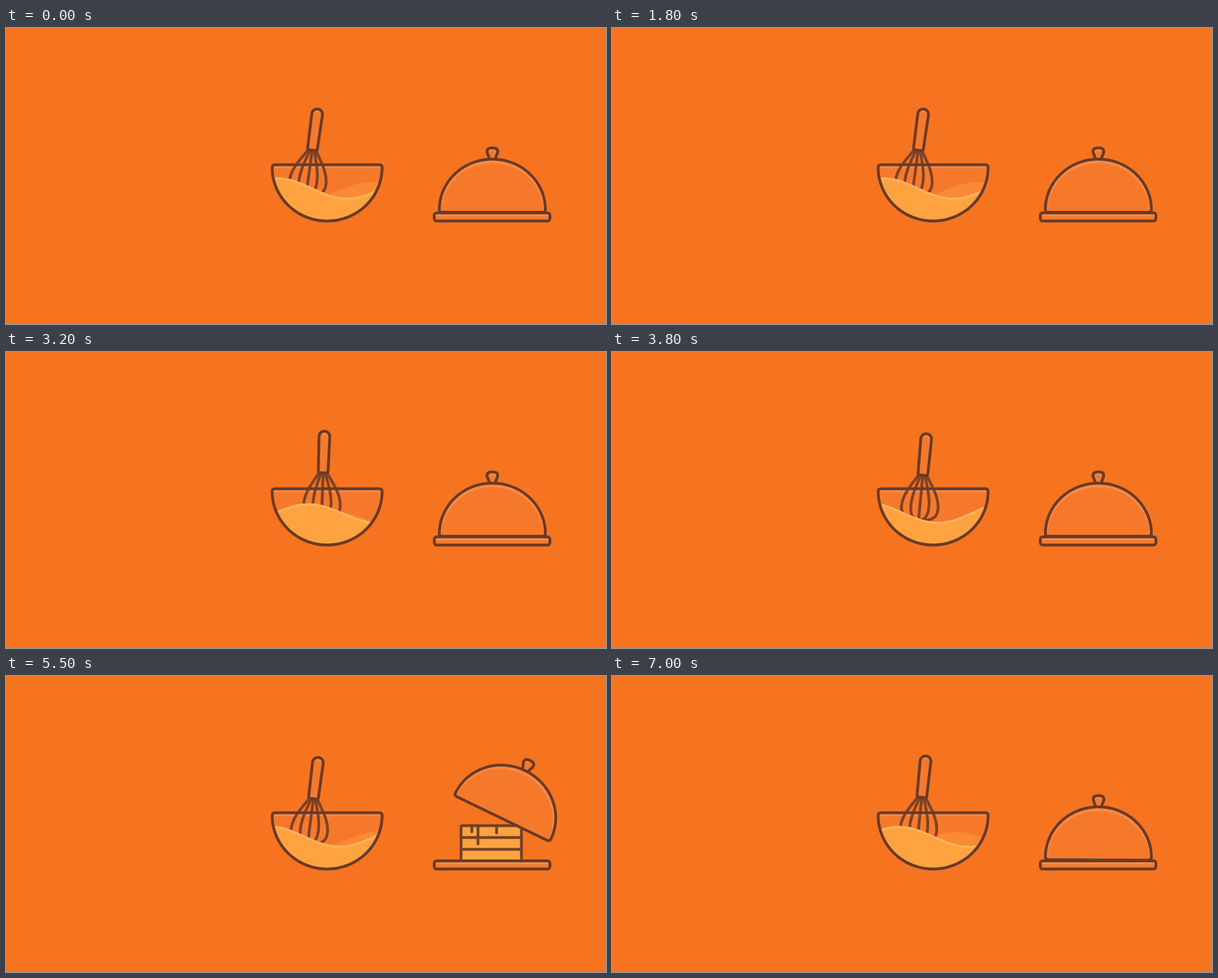
Recreate the animation shown at these times as an HTML page. Size 1064 by 526 pixels, loop 7.1 s.

```html
<!DOCTYPE html>
<html lang="en">
<head>
<meta charset="utf-8">
<title>Whisk and cloche</title>
<style>
  html, body { margin: 0; width: 100%; height: 100%; overflow: hidden; background: #f67420; }
  svg { display: block; width: 100%; height: 100%; }
  .line { fill: none; stroke: #6b3a26; stroke-width: 5; stroke-linecap: round; stroke-linejoin: round; }
  .body { fill: #f6792b; }
  .shine { fill: #fff; fill-opacity: .13; }
  .batter { fill: #ffa340; }
</style>
</head>
<body>
<svg viewBox="0 0 1064 526">
  <defs>
    <path id="bowl" d="M472 248Q472 243 477 243H662Q667 243 667 248A97.5 95 0 0 1 472 248Z"/>
    <path id="dome" d="M768.5 322.5A94 89.5 0 0 1 956.5 322.5Q956.5 327.5 951.5 327.5H773.5Q768.5 327.5 768.5 322.5Z"/>
    <path id="knob" d="M857 232C856 226 853 224 853 219.5Q853 213 862.5 213Q872 213 872 219.5C872 224 869 226 868 232"/>
    <path id="grip" d="M-9.5 -64.5A9.5 9.5 0 0 1 9.5 -64.5L8.7 -3Q8.5 0 5.5 0H-5.5Q-8.5 0 -8.7 -3Z"/>
    <clipPath id="inBowl"><use href="#bowl"/></clipPath>
    <clipPath id="inDome"><use href="#dome"/></clipPath>
  </defs>

  <use href="#bowl" class="body"/>
  <g clip-path="url(#inBowl)">
    <rect class="shine" x="472" y="243" width="195" height="6"/>
    <path id="back" class="batter" opacity=".42"/>
  </g>
  <g id="whisk">
    <g class="line" opacity=".86">
      <path d="M0 0V78"/>
      <path d="M3.5 0C9 18 16 36 16 55C16 70 11 80 0 80C-11 80 -16 70 -16 55C-16 36 -9 18 -3.5 0"/>
      <path d="M7 0C18 18 32 36 32.5 57C32.5 74 22 80 0 80C-22 80 -32.5 74 -32.5 57C-32 36 -18 18 -7 0"/>
    </g>
    <use href="#grip" class="body"/>
    <path class="shine" d="M-7 -64.5A7 7 0 0 1 7 -64.5A7 4 0 0 0 -7 -64.5Z"/>
    <use href="#grip" class="line"/>
  </g>
  <g clip-path="url(#inBowl)">
    <path id="front" class="batter"/>
    <path id="crest" fill="none" stroke="#ffb15c" stroke-width="4"/>
  </g>
  <use href="#bowl" class="line"/>

  <rect class="batter" x="807" y="266" width="107" height="62" rx="4"/>
  <g class="line" opacity=".93">
    <path d="M807 324V268Q807 266 809 266H912Q914 266 914 268V324M807 287H914M807 308H914"/>
    <path id="drips"/>
  </g>

  <rect class="body" x="759.5" y="328.5" width="205" height="14.5" rx="4"/>
  <rect class="shine" x="762" y="331" width="200" height="4"/>
  <rect class="line" x="759.5" y="328.5" width="205" height="14.5" rx="4"/>

  <g id="lid">
    <use href="#knob" class="body"/>
    <path class="shine" d="M855.5 219.5Q855.5 215.5 862.5 215.5Q869.5 215.5 869.5 219.5Q862.5 217.5 855.5 219.5Z"/>
    <use href="#knob" class="line"/>
    <use href="#dome" class="body"/>
    <g clip-path="url(#inDome)">
      <path class="shine" d="M768.5 322.5A94 89.5 0 0 1 956.5 322.5L953 327A90.5 86.5 0 0 0 772 327Z"/>
    </g>
    <use href="#dome" class="line"/>
  </g>
</svg>
<script>
const LOOP = 7100, STEP = 100, CYCLE = 1800, WAVELENGTH = 248, OPEN = 26.5;
const $ = id => document.getElementById(id);
const { sin, cos, PI } = Math;

// Steep symmetric ease: cubic-bezier(.8, 0, .2, 1)
function ease(x) {
  if (x <= 0) return 0;
  if (x >= 1) return 1;
  let lo = 0, hi = 1, s = .5;
  for (let i = 0; i < 24; i++) {
    s = (lo + hi) / 2;
    const at = 2.4 * s * (1 - s) ** 2 + .6 * s * s * (1 - s) + s ** 3;
    if (at < x) lo = s; else hi = s;
  }
  return s * s * (3 - 2 * s);
}

const span = (t, from, to) => ease((t - from) / (to - from));

// Sine surface with a peak at x = peak
function surface(mean, amp, peak) {
  let d = '';
  for (let x = 468; x <= 672; x += 4) {
    const y = mean - amp * cos((x - peak) / WAVELENGTH * 2 * PI);
    d += (d ? 'L' : 'M') + x + ' ' + y.toFixed(2);
  }
  return d;
}

const fillBelow = d => d + 'V350H468Z';

function draw(t) {
  const w = t / CYCLE * 2 * PI;
  const drift = t / CYCLE * WAVELENGTH;
  const bob = cos(w);

  const top = surface(286 - 2.5 * bob, 16.5 + 1.5 * bob, 481 - drift);
  $('front').setAttribute('d', fillBelow(top));
  $('crest').setAttribute('d', top);
  $('crest').setAttribute('transform', 'translate(0 2)');
  $('back').setAttribute('d', fillBelow(
    surface(292.2 - 2.2 * bob + 7 * sin(w) ** 2, 16, 648 + drift + 14 * sin(w))));

  const swing = -26 * cos(w + .22 * (1 - bob) + .1 * sin(w));
  const lift = 217.3 + 2.6 * sin(w);
  $('whisk').setAttribute('transform',
    `translate(${569 + swing} ${lift}) rotate(${-.3 * swing})`);

  const opened = span(t, 3850, 5894);
  const angle = OPEN * (opened - span(t, 6200, 7100));
  $('lid').setAttribute('transform', `rotate(${angle} 1033 327.5)`);

  const drip = (x, len) => `M${x} 266v${len * opened}`;
  $('drips').setAttribute('d', drip(826, 11) + drip(837, 33) + drip(870, 13));
}

const start = performance.now();
function tick() {
  const t = (performance.now() - start) % LOOP;
  draw(Math.floor(t / STEP) * STEP);
  requestAnimationFrame(tick);
}
tick();
</script>
</body>
</html>
```
